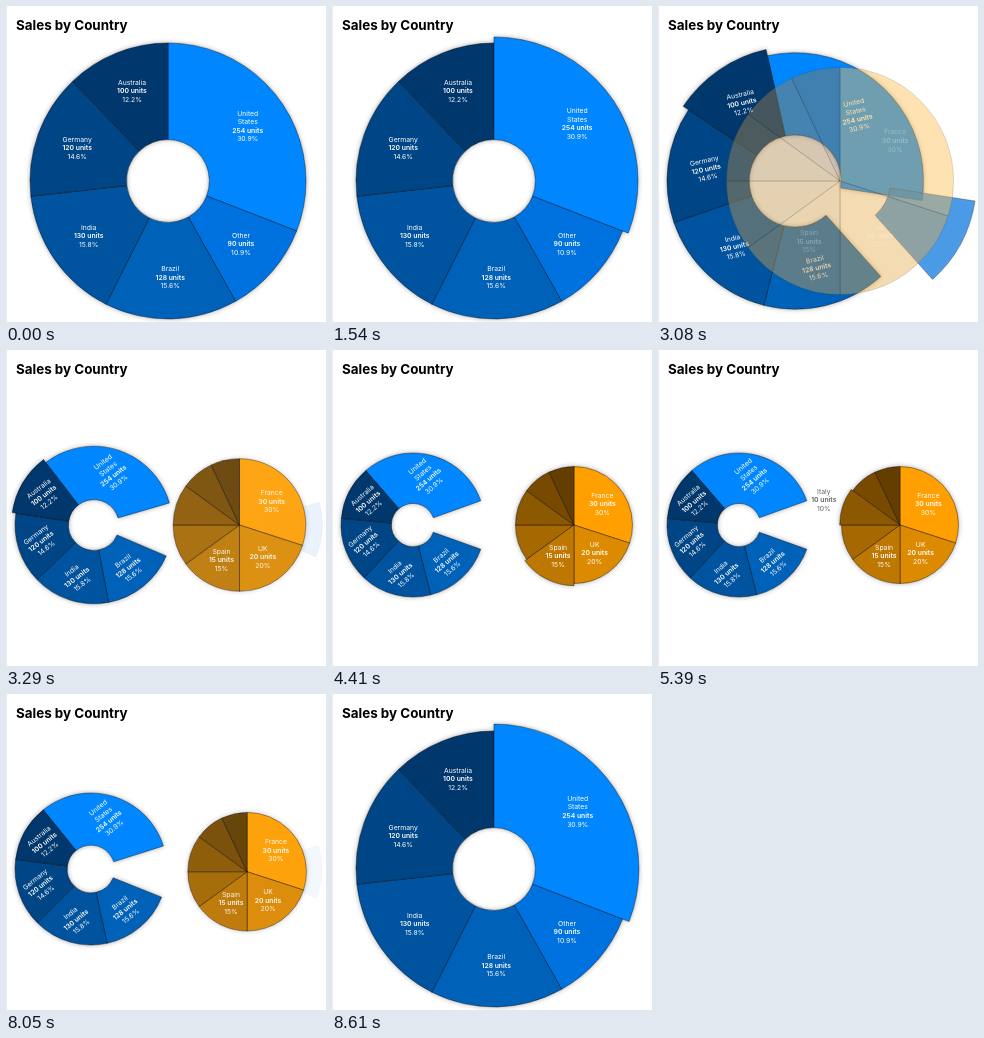
Recreate the animation shown at these times as an HTML page with a canvas. Size 320 px wide and 316 px high, loop 8.89 s.

```html
<!DOCTYPE html>
<html lang="en">
<head>
<meta charset="utf-8">
<title>Sales by Country</title>
<style>
  html, body { margin: 0; width: 100%; height: 100%; overflow: hidden; background: #fff; }
  canvas { position: absolute; left: 0; top: 0; width: 320px; height: 316px; }
  h1 { position: absolute; left: 10px; top: 10px; margin: 0; color: #000;
       font: 700 13.4px/18px Inter, sans-serif; white-space: nowrap; }
</style>
</head>
<body>
<canvas></canvas>
<h1>Sales by Country</h1>
<script>
const LOOP = 8890, STEP = 70, LAST = 8610, MID_Y = 175, TAU = Math.PI * 2;
const canvas = document.querySelector('canvas');
const ctx = canvas.getContext('2d');
const dpr = window.devicePixelRatio || 1;
canvas.width = 320 * dpr;
canvas.height = 316 * dpr;

// Turns [name, units, color] rows into slices with angles clockwise from the top.
function slices(rows) {
  const total = rows.reduce((sum, row) => sum + row[1], 0);
  let angle = 0;
  return rows.map(([name, units, color]) => {
    const from = angle, share = units / total;
    angle += share * TAU;
    const percent = +(share * 100).toFixed(1) + '%';
    return { name, color, from, to: angle, mid: (from + angle) / 2,
             lines: [...name.split('\n'), units + ' units', percent] };
  });
}

const world = slices([
  ['United\nStates', 254, '#0087ff'], ['Other', 90, '#0072df'],
  ['Brazil', 128, '#0061b9'], ['India', 130, '#00539f'],
  ['Germany', 120, '#004585'], ['Australia', 100, '#00376c']
]);
const rest = slices([
  ['France', 30, '#ffa000'], ['UK', 20, '#dc8a00'], ['Spain', 15, '#be7700'],
  ['', 10, '#a66800'], ['Italy', 10, '#8c5800'], ['', 8, '#774a00'], ['', 7, '#633e00']
]);
const TURN = Math.PI / 2 - world[1].mid;

const clamp = x => Math.min(1, Math.max(0, x));
const mix = (a, b, k) => a + (b - a) * k;
const inOut = x => x < .5 ? 4 * x ** 3 : 1 - 4 * (1 - x) ** 3;
const ramp = (t, start, length) => inOut(clamp((t - start) / length));
const between = (t, on, off, length) => ramp(t, on, length) - ramp(t, off, length);

function trace(s, pie) {
  const a = s.from + pie.turn - TAU / 4, b = s.to + pie.turn - TAU / 4;
  const x = pie.place(s);
  ctx.beginPath();
  ctx.arc(x, pie.y, pie.radius * (1 + .05 * pie.pop(s)), a, b);
  ctx.arc(x, pie.y, pie.hole, b, a, true);
  ctx.closePath();
}

// A pale backing carries the shadow; the coloured slices go on top of it.
function drawPie(list, pie) {
  const visible = list.filter(s => pie.fade(s) > 0).sort((a, b) => pie.pop(a) - pie.pop(b));
  ctx.fillStyle = '#fff';
  ctx.shadowBlur = 5 * dpr;
  for (const s of visible) {
    const alpha = pie.fade(s);
    trace(s, pie);
    ctx.globalAlpha = .6 * alpha;
    ctx.shadowColor = `rgba(0,0,0,${.6 * alpha ** 4})`;
    ctx.fill();
  }
  ctx.shadowColor = 'transparent';
  ctx.lineWidth = .5;
  ctx.strokeStyle = 'rgba(0,0,0,.8)';
  for (const s of visible) {
    trace(s, pie);
    ctx.globalAlpha = pie.fade(s);
    ctx.fillStyle = s.color;
    ctx.fill();
    ctx.stroke();
  }
}

function drawLabel(s, pie, distance, alpha, color = '#fff') {
  if (!s.name || alpha <= 0) return;
  ctx.save();
  ctx.globalAlpha = alpha;
  ctx.fillStyle = color;
  ctx.translate(pie.place(s), pie.y);
  ctx.rotate(pie.turn);
  ctx.translate(distance * Math.sin(s.mid), -distance * Math.cos(s.mid));
  const n = s.lines.length;
  s.lines.forEach((line, i) => {
    ctx.font = `${i === n - 2 ? 600 : 400} 6.8px Inter, sans-serif`;
    ctx.fillText(line, 0, (i - (n - 1) / 2) * 8.6);
  });
  ctx.restore();
}

function drawWorld(t, p) {
  const x = mix(162, 81, p), radius = Math.min(138, x - 9);
  const pops = {
    'United\nStates': between(t, 70, 1406, 420) + ramp(t, 8190, 400),
    Other: .6 * between(t, 2600, 7900, 400),
    Australia: between(t, 2450, 3200, 400)
  };
  const pie = {
    y: MID_Y, radius, hole: radius * (.3 + .28 * p * (1 - p)), turn: TURN * p,
    pop: s => pops[s.name] || 0,
    place: s => s.name === 'Other' ? x + 161 * p : x,
    fade: s => s.name === 'Other' ? 1 - p : 1
  };
  drawPie(world, pie);
  for (const s of world) {
    const alpha = s.name === 'Other' ? 1 - 4 * p : 1;
    drawLabel(s, pie, .7 * radius * (1 + .05 * pie.pop(s)), alpha);
  }
}

function drawRest(t, p) {
  if (p <= 0) return;
  const q = between(t, 2806, 7954, 690);
  const sink = t > 7800 ? 55 * (1 - p) : 0;
  const x = mix(162, 242, q), radius = mix(132, 58.5, q);
  const pops = {
    Spain: between(t, 4200, 4900, 350),
    Italy: between(t, 5200, 7300, 350)
  };
  const pie = {
    y: MID_Y + sink, radius, hole: 0, turn: 0,
    pop: s => pops[s.name] || 0, place: () => x, fade: () => p
  };
  drawPie(rest, pie);
  for (const s of rest) {
    if (s.name === 'Italy') drawLabel(s, pie, 1.37 * radius, pops.Italy * p, '#000');
    else drawLabel(s, pie, .6 * radius, p);
  }
}

function frame(now) {
  const t = Math.min(LAST, Math.floor(now % LOOP / STEP) * STEP);
  const p = between(t, 2783, 7888, 700);
  ctx.setTransform(dpr, 0, 0, dpr, 0, 0);
  ctx.globalAlpha = 1;
  ctx.fillStyle = '#fff';
  ctx.fillRect(0, 0, 320, 316);
  ctx.fillStyle = '#ececec';
  ctx.fillRect(0, 0, 1, 316);
  ctx.textAlign = 'center';
  ctx.textBaseline = 'middle';
  drawWorld(t, p);
  drawRest(t, p);
  requestAnimationFrame(frame);
}
requestAnimationFrame(frame);
</script>
</body>
</html>
```
